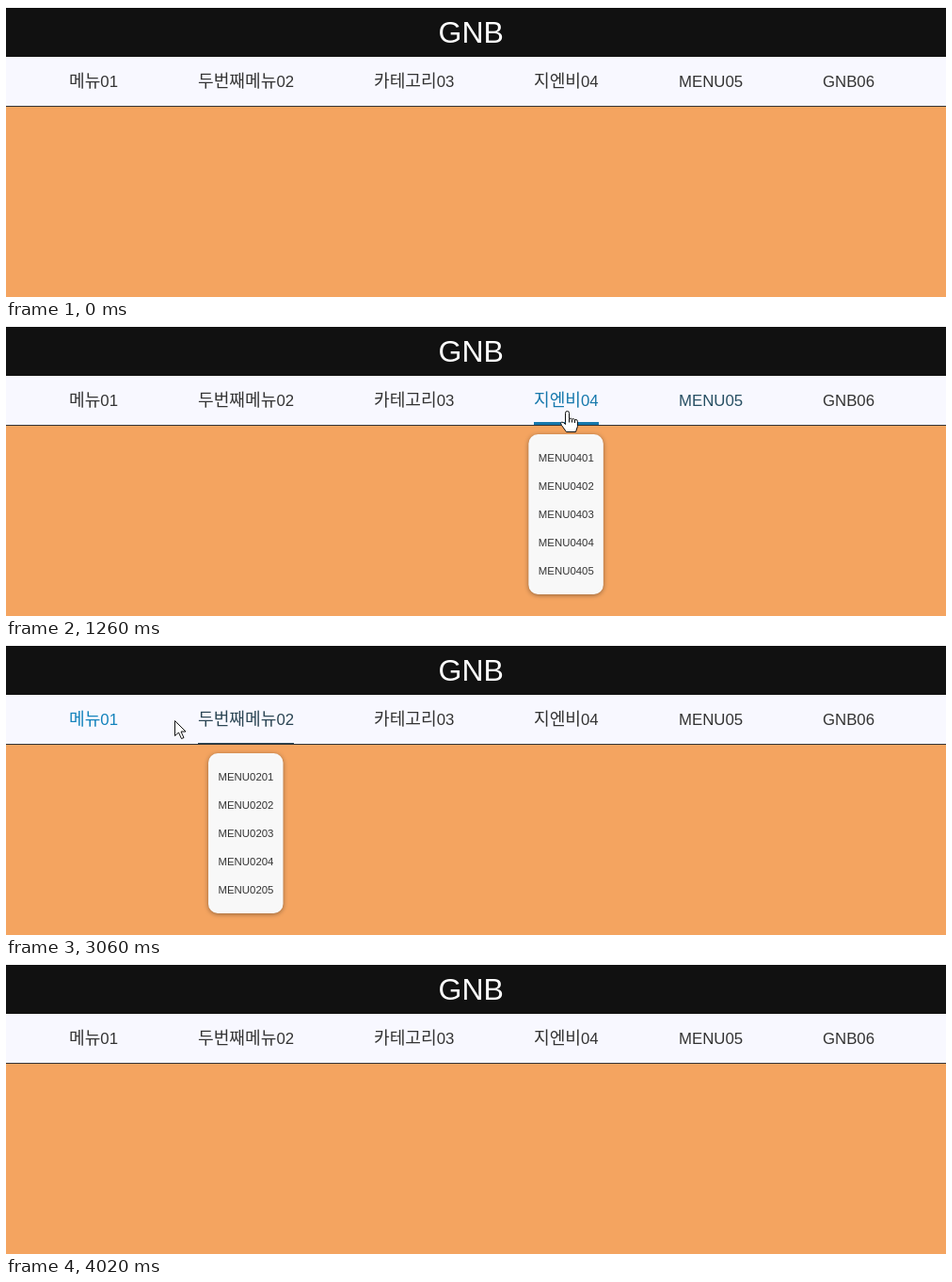
These frames come from a looping animation (999 by 309 pixels, 4.62 s). An HTML page with a canvas:

```html
<!DOCTYPE html>
<html lang="ko">
<head>
<meta charset="utf-8">
<title>GNB</title>
<style>
html, body { margin: 0; height: 100%; overflow: hidden; }
canvas { display: block; }
</style>
</head>
<body>
<canvas width="999" height="309"></canvas>
<script>
const ctx = document.querySelector('canvas').getContext('2d');
const LOOP = 4620, STEP = 60, FADE = 300, EXIT = 4020;
const GAP = 85, SIZE = 16.8, NAV_TOP = 54, NAV_LINE = 106;
const DARK = [51, 51, 51], BLUE = [10, 148, 220];
const LATIN = '"Liberation Sans", sans-serif';
const HANGUL = '"Noto Sans CJK KR", "Noto Sans CJK", sans-serif';

const arrow = new Path2D('M0 0V16l4-3.5 3 6.5 2.5-1-3-6.5H11.5z');
const hand = new Path2D('M-2 12V2q0-2 2-2t2 2v6q2-1 3 .5q2-.8 3 .5q3-.5 3 2v5l-2 6h-10l-5-7q-2-3 0-3.5q2 0 4 2.5z' +
  'M2 8v4M5 9v3M8 9.5v3');

// key points of the pointer: time, x, y
const track = [
  [240, 988, 25], [720, 870, 96], [840, 774, 95], [1080, 700, 94], [1260, 596, 91],
  [1860, 380, 80], [1920, 291, 76], [2280, 95, 82], [2460, 128, 77], [3000, 128, 77],
  [3240, 330, 92], [3300, 486, 98], [3480, 900, 90], [3720, 976, 75], [EXIT, 976, 75]
];

// Draws mixed Hangul and Latin text and returns its width.
function text(str, x, y, size, color) {
  const start = x;
  ctx.fillStyle = color;
  for (const part of str.match(/[\x00-\x7f]+|[^\x00-\x7f]+/g)) {
    ctx.font = part < '\x7f' ? `${size}px ${LATIN}` : `${size * 1.08}px ${HANGUL}`;
    ctx.fillText(part, x, y);
    x += ctx.measureText(part).width;
  }
  return x - start;
}

function rect(color, y, h, x = 0, w = 999) {
  ctx.fillStyle = color;
  ctx.fillRect(x, y, w, h);
}

let edge = 67;
const menus = ['메뉴01', '두번째메뉴02', '카테고리03', '지엔비04', 'MENU05', 'GNB06'].map(label => {
  const x = Math.round(edge), w = text(label, 0, 0, SIZE, '#000');
  edge += w + GAP;
  return { label, x, w, center: x + w / 2 };
});

function pointerAt(t) {
  const next = track.findIndex(key => key[0] > t);
  if (next < 1) return null;
  const [t0, x0, y0] = track[next - 1], [t1, x1, y1] = track[next];
  const p = (t - t0) / (t1 - t0);
  return { x: x0 + (x1 - x0) * p, y: y0 + (y1 - y0) * p };
}

function hoveredAt(t) {
  const tip = pointerAt(t);
  return tip && tip.y > NAV_TOP
    ? menus.find(m => Math.abs(tip.x - m.center) < (m.w + GAP) / 2)
    : undefined;
}

// Share of the last FADE ms spent on the item, eased out in both directions.
function glow(menu, t, active) {
  let share = 0;
  for (let ago = 0; ago < FADE; ago += 10) share += (hoveredAt(t - ago) === menu) * 10 / FADE;
  return active ? 1 - (1 - share) ** 2 : share ** 2;
}

const mix = p => `rgb(${DARK.map((c, i) => Math.round(c + (BLUE[i] - c) * p))})`;

function dropdown(menu) {
  const left = menu.center - 40, number = menus.indexOf(menu) + 1;
  ctx.save();
  ctx.shadowColor = 'rgba(0,0,0,.4)';
  ctx.shadowBlur = 5;
  ctx.shadowOffsetY = 1;
  ctx.fillStyle = '#f8f8f8';
  ctx.beginPath();
  ctx.roundRect(left, 116, 79.5, 170, 10);
  ctx.fill();
  ctx.restore();
  for (let row = 1; row <= 5; row++) {
    text(`MENU0${number}0${row}`, left + 10.5, 115 + row * 30, 11.4, '#333');
  }
}

function drawPointer({ x, y }, menu) {
  const shape = menu && Math.abs(x - menu.center) <= menu.w / 2 ? hand : arrow;
  ctx.save();
  ctx.translate(Math.round(x) + .5, Math.round(y) + .5);
  ctx.fillStyle = '#fff';
  ctx.strokeStyle = '#111';
  ctx.fill(shape);
  ctx.stroke(shape);
  ctx.restore();
}

function draw(now) {
  const t = Math.floor(now % LOOP / STEP) * STEP;
  const tip = pointerAt(t), hovered = hoveredAt(t);

  rect('#fff', 0, 2);
  rect('#111', 2, 52);
  rect('#f8f8ff', NAV_TOP, 52);
  rect('#333', NAV_LINE, 1);
  rect('#f4a460', NAV_LINE + 1, 202);
  text('GNB', 459.5, 39, 32, '#fff');

  for (const menu of menus) {
    const active = menu === hovered, level = glow(menu, t, active);
    text(menu.label, menu.x, 86, SIZE, mix(level));
    if (active) {
      const thickness = Math.round(4 * level);
      rect(mix(level), NAV_LINE - thickness, thickness, menu.x, Math.round(menu.w));
    }
  }
  if (hovered) dropdown(hovered);
  if (tip) drawPointer(tip, hovered);
}

const began = performance.now();
(function frame() {
  draw(performance.now() - began);
  requestAnimationFrame(frame);
})();
</script>
</body>
</html>
```
